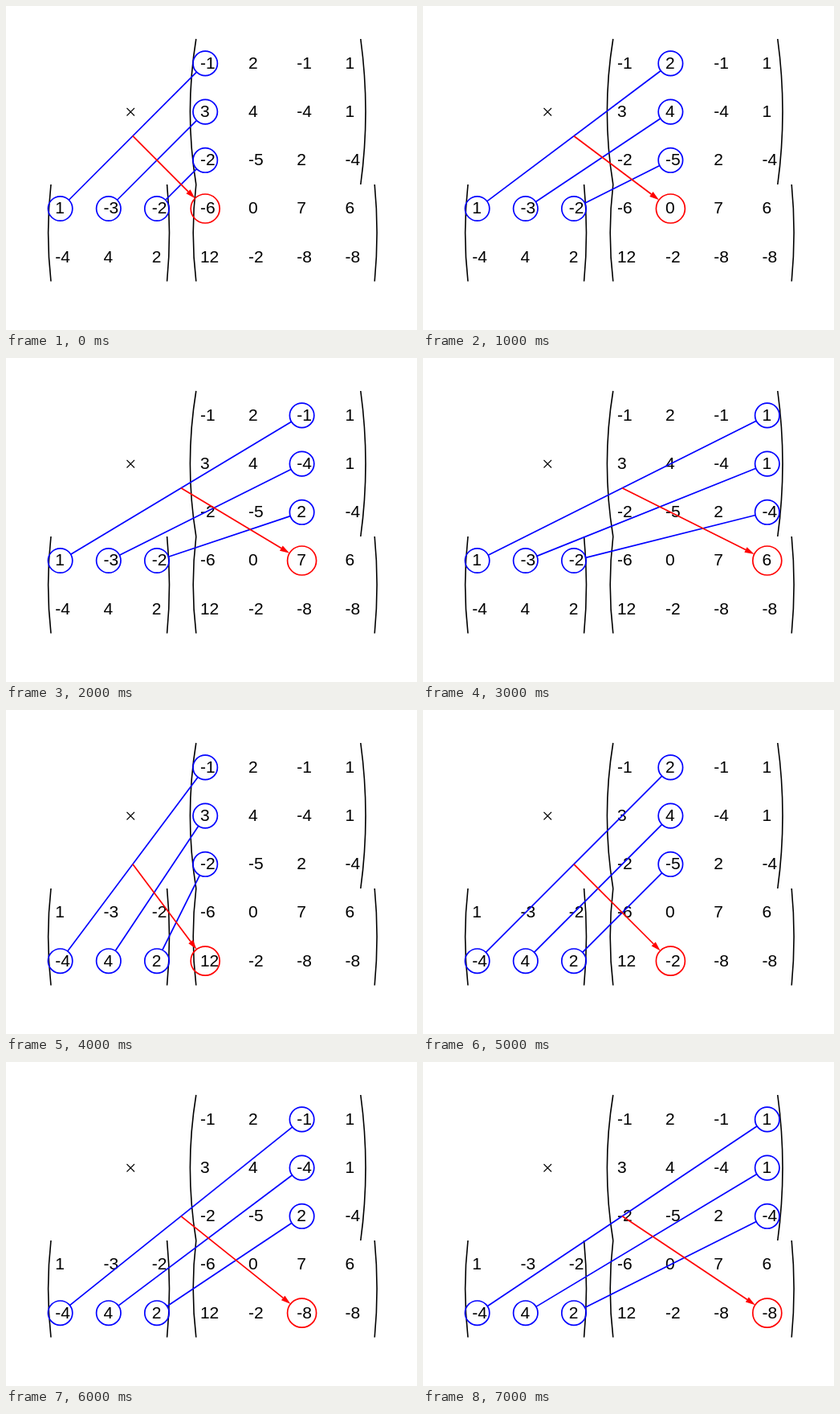
An HTML page with a canvas for the animation above (8 s loop, 512x403 px).

```html
<!DOCTYPE html>
<html lang="en">
<head>
<meta charset="utf-8">
<title>Matrix multiplication</title>
<style>
  html, body { margin: 0; width: 100%; height: 100%; overflow: hidden; background: #fff; }
  canvas { display: block; }
</style>
</head>
<body>
<canvas width="512" height="403"></canvas>
<script>
const ctx = document.querySelector('canvas').getContext('2d');
const STEP_MS = 1000;
const BLUE = '#00f', RED = '#f00';
const RADIUS = 15.2, RESULT_RADIUS = 18;

const left = [[1, -3, -2], [-4, 4, 2]];
const top4 = [[-1, 2, -1, 1], [3, 4, -4, 1], [-2, -5, 2, -4]];
const product = left.map(row =>
  top4[0].map((_, c) => row.reduce((sum, v, k) => sum + v * top4[k][c], 0)));

// Centre of a cell on the common grid: columns 0-6, rows 0-4.
const cell = (col, row) => ({ x: 67.6 + 60.2 * col, y: 71.4 + 60.2 * row });

function stroke(color, width, trace) {
  ctx.strokeStyle = color;
  ctx.lineWidth = width;
  ctx.beginPath();
  trace();
  ctx.stroke();
}

function line(a, b, color, width = 1.7) {
  stroke(color, width, () => { ctx.moveTo(a.x, a.y); ctx.lineTo(b.x, b.y); });
}

function circle(p, radius, color) {
  stroke(color, 1.7, () => ctx.arc(p.x, p.y, radius, 0, 2 * Math.PI));
}

function paren(x, y1, y2, bulge) {
  stroke('#000', 1.6, () => {
    ctx.moveTo(x, y1);
    ctx.quadraticCurveTo(x + 2 * bulge, (y1 + y2) / 2, x, y2);
  });
}

function matrix(values, col, row) {
  values.forEach((cells, r) => cells.forEach((value, c) => {
    const p = cell(col + c, row + r);
    ctx.fillText(value, p.x - 6.3, p.y + 6.3);
  }));
}

// Point on the segment from a to b, `gap` pixels away from a.
function offset(a, b, gap) {
  const t = gap / Math.hypot(b.x - a.x, b.y - a.y);
  return { x: a.x + (b.x - a.x) * t, y: a.y + (b.y - a.y) * t };
}

function arrow(from, target) {
  const tip = offset(target, from, RESULT_RADIUS);
  const base = offset(tip, from, 12);
  const nx = (tip.y - base.y) * 0.3, ny = (base.x - tip.x) * 0.3;
  line(from, base, RED);
  ctx.fillStyle = RED;
  ctx.beginPath();
  ctx.moveTo(tip.x, tip.y);
  ctx.lineTo(base.x + nx, base.y + ny);
  ctx.lineTo(base.x - nx, base.y - ny);
  ctx.fill();
}

function drawMatrices() {
  ctx.fillStyle = '#000';
  ctx.font = '21px "Liberation Sans", Arial, sans-serif';
  matrix(top4, 3, 0);
  matrix(left, 0, 3);
  matrix(product, 3, 3);

  paren(236.8, 41, 222, -7.4);
  paren(441.8, 41, 222, 6.2);
  paren(56, 222, 342.5, -3.4);
  paren(200.6, 222, 342.5, 2.9);
  paren(236.8, 222, 342.5, -3.6);
  paren(459.2, 222, 342.5, 2.9);

  line({ x: 150.5, y: 127 }, { x: 160, y: 136.5 }, '#000', 1.1);
  line({ x: 150.5, y: 136.5 }, { x: 160, y: 127 }, '#000', 1.1);
}

function drawStep(row, col) {
  for (let k = 0; k < 3; k++) {
    const a = cell(k, 3 + row), b = cell(3 + col, k);
    circle(a, RADIUS, BLUE);
    circle(b, RADIUS, BLUE);
    line(offset(a, b, RADIUS), offset(b, a, RADIUS), BLUE);
  }
  const a = cell(0, 3 + row), b = cell(3 + col, 0), target = cell(3 + col, 3 + row);
  circle(target, RESULT_RADIUS, RED);
  arrow({ x: (a.x + b.x) / 2, y: (a.y + b.y) / 2 }, target);
}

function frame() {
  const step = Math.floor(performance.now() / STEP_MS) % 8;
  ctx.fillStyle = '#fff';
  ctx.fillRect(0, 0, 512, 403);
  drawMatrices();
  drawStep(Math.floor(step / 4), step % 4);
  requestAnimationFrame(frame);
}
frame();
</script>
</body>
</html>
```
